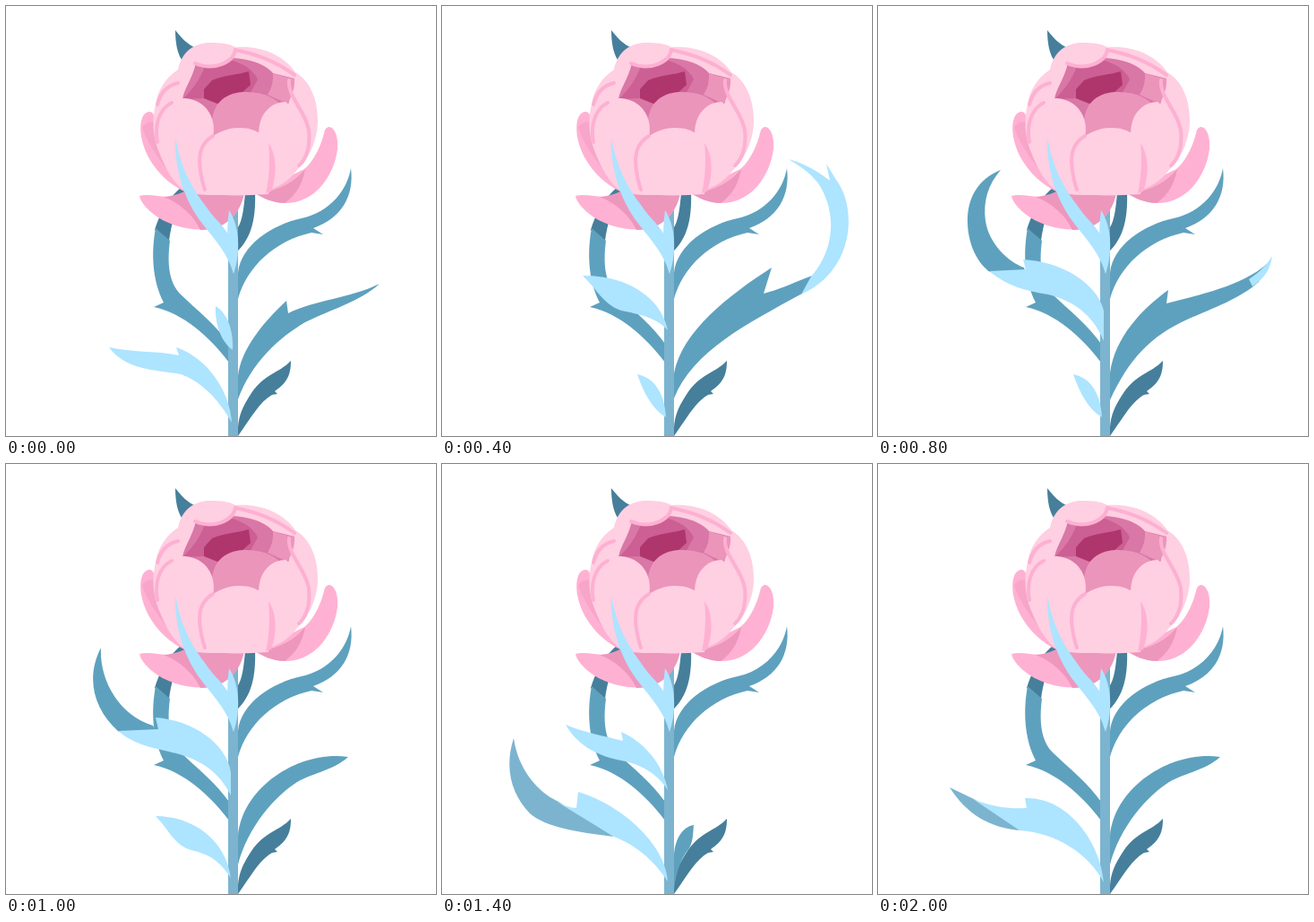
Recreate the animation shown at these times as an HTML page. Size 480x480 px, loop 2.2 s.

```html
<!DOCTYPE html>
<html lang="en">
<head>
<meta charset="utf-8">
<title>Peony</title>
<style>
html, body { margin: 0; width: 100%; height: 100%; overflow: hidden; background: #fff; }
svg { display: block; width: 100%; height: 100%; }
.dark { fill: #467f9b; }
.mid { fill: #5ea1be; }
.stem { fill: #7cb4cf; }
.light { fill: #ade4ff; }
.blush { fill: #ffcfe2; }
.pink { fill: #ffb1d3; }
.shade { fill: #ed97bd; }
.rose { fill: #eb95bb; }
.mauve { fill: #d977a6; }
.berry { fill: #cc5f93; }
.core { fill: #af366c; }
.fold { fill: none; stroke: #fdb0d2; stroke-width: 4; stroke-linecap: round; }
</style>
</head>
<body>
<svg viewBox="0 0 480 480">
  <g id="back">
    <path class="dark" d="M197 201C181 214 171 233 166 250L182 262C184 245 190 225 200 207Z"/>
    <path class="mid" d="M167 248C162 275 163 306 176 331L165 336C198 343 227 369 249 398V377C235 357 214 340 195 322C181 308 180 285 183 262Z"/>
    <path class="dark" d="M267 208C265 234 262 244 257 250V275C275 259 279 235 278 208Z"/>
    <path class="mid" d="M385 181C381 205 362 230 330 237C297 244 262 267 259 298V327C269 291 300 262 341 253L354 255L343 248C374 237 389 213 385 181Z"/>
    <path class="dark" d="M318 396C306 409 288 411 274 432C264 447 260 457 259 470V480C274 459 283 442 297 434L303 433L300 430C315 420 318 410 318 396Z"/>
  </g>
  <g id="right"><path class="mid"/><path class="light"/></g>
  <path class="stem" d="M248 228H259V480H248Z"/>
  <g id="upper"><path class="mid"/><path class="light"/></g>
  <g id="lower"><path class="stem"/><path class="light"/></g>
  <g id="bloom">
    <path class="dark" d="M189 27C189 40 191 52 196 60L212 47C203 43 196 36 189 27Z"/>
    <path class="pink" d="M160 118C151 119 149 132 151 146C156 173 176 196 199 207L205 195C182 178 169 155 166 126C165 121 164 118 160 118Z"/>
    <path class="shade" d="M152 135C160 160 178 180 199 207L205 195C182 178 169 155 166 130C161 128 156 130 152 135Z" opacity=".45"/>
    <path class="pink" d="M361 135C368 136 371 148 370 160C366 190 345 220 312 220C298 220 286 214 278 209L333 182C345 172 352 154 355 142C356 137 358 135 361 135Z"/>
    <path class="shade" d="M278 209C307 207 324 194 334 182C331 199 323 212 311 220C298 220 286 214 278 209Z"/>
    <path class="pink" d="M149 212C159 209 174 214 187 213C200 210 203 206 215 203L266 209C262 228 252 240 238 246C218 254 183 248 163 231C156 225 150 218 149 212Z"/>
    <path class="shade" d="M176 213C190 212 200 207 206 203L266 209C262 228 252 240 238 246Q228 250 217 250C210 235 196 221 176 213Z"/>
    <path class="blush" d="M256 46C285 44 310 55 323 74C340 84 348 105 348 128C348 152 336 173 325 183C312 201 290 211 255 211C230 211 212 212 199 206C185 195 175 175 168 155C163 140 164 120 167 110C169 95 178 80 192 71C196 51 210 41 228 41C240 41 250 42 256 46Z"/>
    <path class="mauve" d="M197 104C199 92 208 81 212 64C223 70 239 67 249 58C266 58 288 63 298 75L322 81L315 110L285 142H232C231 121 216 106 197 104Z"/>
    <path class="berry" d="M222 67C234 68 243 65 250 60C266 65 276 71 281 82L272 98L236 109L221 103L197 104C207 95 217 82 222 67Z"/>
    <path class="rose" d="M298 75C306 78 314 80 322 81C323 92 318 103 314 109L292 99Q299 88 298 75Z"/>
    <path class="core" d="M221 93L230 83C244 77 258 77 271 73L273 88L262 98L236 109L221 103Z"/>
    <path class="rose" d="M230 136C228 110 244 97 265 96C288 95 304 104 312 116L284 145L231 146Z"/>
    <path class="blush" d="M168 155C163 123 180 102 200 103C222 105 236 123 231 148C222 170 225 190 220 205L199 206C184 195 175 175 168 155Z"/>
    <path class="blush" d="M282 143C282 118 298 107 312 107C330 119 338 140 335 161L290 209Z"/>
    <path class="blush" d="M217 181C213 154 234 137 259 136C278 135 296 146 299 165L293 210C266 212 242 212 222 209Z"/>
    <path class="pink" d="M293 153C302 166 303 188 296 207L290 209C294 192 295 172 293 153Z"/>
    <path class="fold" d="M231 145C218 153 214 165 217 184Q219 197 222 205M316 83C314 101 335 118 338 139C340 157 335 171 327 178M185 108C169 116 166 136 169 152"/>
    <path class="fold" d="M192 86C179 89 172 98 169 110M211 64C232 73 254 63 256 49C280 54 300 61 322 77" stroke-width="3"/>
  </g>
  <path class="light" d="M189 147C188 184 200 219 220 244C234 262 248 277 254 299L253 266C247 247 233 239 222 222C206 201 195 180 189 147Z"/>
  <path class="light" d="M249 228C246 250 246 276 254 299C262 276 261 246 249 228Z"/>
</svg>
<script>
const STEP = 200, COUNT = 11;

// Each pose holds [turned side, light side].
const right = {
  sprout: ["M269 434C263 437 259 446 259 456V478C261 464 264 458 267 453Q270 444 269 434Z"],
  bud: ["M281 403C268 405 259 420 259 440V475C262 452 268 440 273 433C281 424 280 412 281 403Z"],
  small: ["M311 374C285 380 262 405 259 435V470C266 446 280 431 292 421C305 406 303 388 311 374Z"],
  young: ["M315 358C285 369 261 395 259 430V467C267 440 280 426 290 418C304 402 306 380 315 358Z"],
  plain: ["M382 327C328 319 264 360 259 415V447C270 405 300 371 325 355C345 344 365 342 382 327Z"],
  barbed: ["M417 310C385 326 345 328 315 343L313 329C285 355 262 385 259 413V439C274 398 305 370 334 353C362 339 395 330 417 310Z"],
  reach: ["M438 284C414 309 370 320 322 332L324 317C295 338 264 370 259 410V440C280 394 305 368 345 350C375 337 405 326 425 308Z",
    "M440 279C434 289 426 297 414 305L418 313C430 305 438 295 440 279Z"],
  curl: ["M413 301C390 310 375 317 359 321L368 292C320 323 268 363 259 410V438C280 385 340 355 402 321Z",
    "M387 171C402 175 418 183 433 195L429 176L440 194C463 224 462 294 401 322L412 302C440 270 440 228 420 198C410 185 398 178 387 171Z"]
};

const upper = {
  none: [],
  bud: ["", "M234 335C246 342 254 360 253 384C240 375 233 355 234 335Z"],
  small: ["", "M226 327C240 332 251 350 251 376C235 365 228 350 226 327Z"],
  young: ["", "M190 315C220 315 247 335 252 368C240 356 230 354 219 351C205 344 199 327 190 315Z"],
  plain: ["", "M157 301C205 300 245 325 252 362C240 348 220 344 200 340C180 333 172 315 157 301Z"],
  barbed: ["", "M138 291C160 300 182 304 202 309L200 299C225 310 247 335 252 364C240 345 222 335 200 331C170 325 150 312 138 291Z"],
  bend: ["M96 231C105 265 135 288 164 292L179 292V300L128 300C108 280 95 258 96 231Z",
    "M128 300L181 298L176 284C215 289 246 320 250 362C235 345 215 341 195 331C170 318 145 317 128 300Z"],
  hook: ["M106 205C104 240 125 280 164 292L168 300L126 299C97 273 89 238 106 205Z",
    "M125 298L170 296L167 283C209 286 246 312 251 344V370C238 344 219 331 190 323C165 317 144 314 125 298Z"],
  curl: ["M137 183C112 193 99 214 100 243C101 268 112 288 125 297L165 298L163 292C146 286 124 266 120 240C117 218 123 199 137 183Z",
    "M124 296L165 294L162 283C205 285 245 310 252 340V374C240 345 220 330 190 322C165 318 145 313 124 296Z"]
};

const lower = {
  sprout: ["", "M233 427C244 432 249 440 250 457C241 451 235 440 233 427Z"],
  bud: ["", "M218 411C236 415 248 430 250 459C239 453 227 438 218 411Z"],
  young: ["", "M167 393C207 393 245 418 251 462C235 438 222 435 207 431C188 426 181 407 167 393Z"],
  barbed: ["", "M115 381C145 387 170 385 193 390L190 381C225 393 250 430 252 465C235 435 215 418 195 411C165 406 133 406 115 381Z"],
  bend: ["M80 361L109 375L160 409C125 407 98 390 80 361Z",
    "M106 374C130 384 150 385 166 384L164 373C210 371 248 420 252 467C235 435 200 412 158 409Z"],
  hook: ["M80 306C85 340 105 365 130 377L192 416C150 411 115 405 98 390C78 369 69 340 80 306Z",
    "M128 377C136 381 143 384 150 384L152 366C200 380 250 425 252 466C235 440 215 425 192 416Z"],
  curl: ["M102 267C88 310 90 342 112 373L192 420C155 416 115 410 95 385C70 350 74 300 102 267Z",
    "M110 373C122 379 132 379 141 377L137 362C195 367 245 410 252 470C235 440 215 425 195 421C170 414 140 405 110 373Z"],
  peak: ["M110 251C92 297 90 339 114 373L192 420C153 416 113 409 93 384C67 348 75 289 110 251Z",
    "M112 372C123 378 134 378 143 375L140 361C197 367 246 410 252 470C235 440 215 425 195 421C168 413 140 402 112 372Z"]
};

const plan = [
  ["right", right, "barbed reach curl curl reach plain young bud sprout small plain"],
  ["upper", upper, "bud young plain bend curl hook bend barbed young small none"],
  ["lower", lower, "barbed young bud sprout bud young barbed hook peak curl bend"]
].map(([id, poses, order]) => ({
  poses,
  order: order.split(" "),
  paths: document.getElementById(id).children
}));

let shown = -1;

function draw(time) {
  const step = Math.floor(time / STEP) % COUNT;
  if (step !== shown) {
    shown = step;
    for (const { poses, order, paths } of plan) {
      const pose = poses[order[step]];
      for (let i = 0; i < 2; i++) paths[i].setAttribute("d", pose[i] || "");
    }
  }
}

const start = performance.now();
function tick() {
  draw(performance.now() - start);
  requestAnimationFrame(tick);
}
tick();
</script>
</body>
</html>
```
